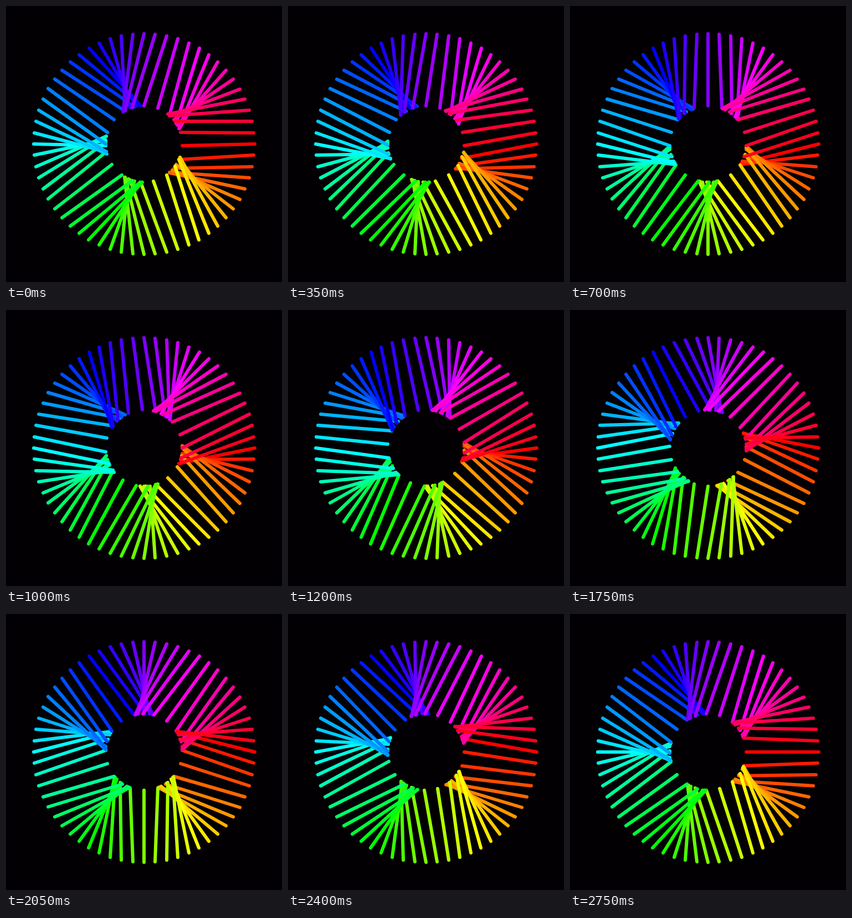
Animation, 498 px wide and 498 px high, one loop 2800 ms. Source, as an HTML page with a canvas:

```html
<!DOCTYPE html>
<html lang="en">
<head>
<meta charset="utf-8">
<title>Colour wheel wave</title>
<style>
  html, body { margin: 0; width: 100%; height: 100%; overflow: hidden; background: #020003; }
  canvas { display: block; }
</style>
</head>
<body>
<canvas id="stage" width="498" height="498"></canvas>
<script>
  const ctx = document.getElementById('stage').getContext('2d');
  const LOOP = 2800, TICK = 50;
  const CENTER = 249, OUTER = 200, INNER = 70;
  const SPOKES = 60, WAVES = 5, SWING = 30;
  const SKIPS = [25, 32, 39, 46]; // ticks that advance two steps
  const rad = deg => deg * 3.1416 / 180;

  // Ends sit on whole pixels, cut towards the centre.
  function point(radius, deg) {
    return [Math.cos(rad(deg)), Math.sin(rad(deg))].map(v => CENTER + Math.trunc(radius * v));
  }

  function draw(time) {
    const tick = Math.floor((time % LOOP) / TICK);
    const step = tick + 1 + SKIPS.filter(s => tick >= s).length;
    const phase = step * 6;

    ctx.fillStyle = '#020003';
    ctx.fillRect(0, 0, 498, 498);
    ctx.lineWidth = 6;
    ctx.lineCap = 'round';
    for (let i = 0; i < SPOKES; i++) {
      const angle = i * 360 / SPOKES;
      const swing = SWING * Math.sin(rad(WAVES * angle + phase));
      ctx.strokeStyle = `hsl(${angle}, 100%, 50%)`;
      ctx.beginPath();
      ctx.moveTo(...point(OUTER, angle));
      ctx.lineTo(...point(INNER, angle + swing));
      ctx.stroke();
    }
  }

  function loop() {
    draw(performance.now());
    requestAnimationFrame(loop);
  }
  loop();
</script>
</body>
</html>
```
